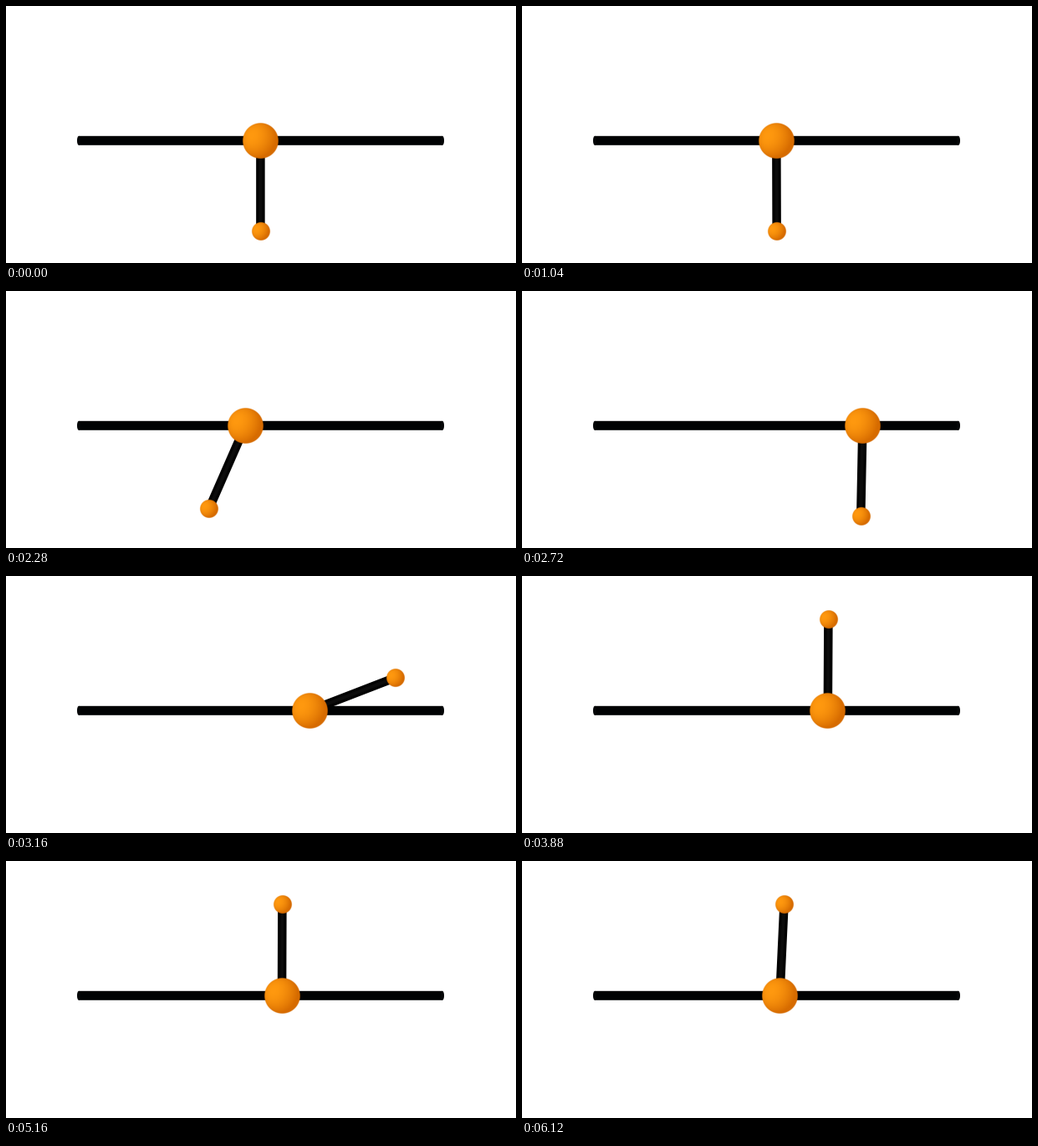
A matplotlib script for the animation above (7.04 s loop, 610 by 308 pixels).

```python
import numpy as np
import matplotlib.pyplot as plt
from matplotlib.animation import FuncAnimation
from matplotlib.patches import Ellipse

W, H, DPI = 610, 308, 100
STEP, FRAMES = 40, 176
CX, CY = 304.4, 161.3
ROD, THICK = 109.1, 11
R_CART, R_BOB = 21.3, 10.6

# key times in s, cart offsets in pixels, rod angles in radians from down
TIMES = np.array([0.96, 1.68, 1.84, 2.28, 2.46, 2.72, 3.0,
                  3.16, 3.5, 3.88, 4.3, 5.16, 6.12])
CART = [0, -14, -23, -18, 37, 103, 100, 59.2, 31, 61.4, 62, 25.6, 4]
ANGLE = [0, 0.105, 0.11, -0.412, -0.79, -0.02, 1.3,
         1.94, 2.87, 3.136, 3.18, 3.138, 3.095]


def spline(values):
    """Smooth curve through the key values, at rest before the first."""
    v = np.array(values, float)
    slope = np.gradient(v, TIMES)
    slope[0] = 0

    def at(t):
        t = np.clip(t, TIMES[0], TIMES[-1])
        i = min(np.searchsorted(TIMES, t, side="right"), len(TIMES) - 1) - 1
        h = TIMES[i + 1] - TIMES[i]
        s = (t - TIMES[i]) / h
        return ((1 - s) ** 2 * ((1 + 2 * s) * v[i] + s * h * slope[i])
                + s * s * ((3 - 2 * s) * v[i + 1] + (s - 1) * h * slope[i + 1]))

    return at


cart_at, angle_at = spline(CART), spline(ANGLE)


def ball_image(n=200):
    """Orange ball lit from the upper left, on a transparent square."""
    v = np.linspace(-1.1, 1.1, n)
    x, y = np.meshgrid(v, v)
    r = np.hypot(x, y)
    k = 1 / np.maximum(r, 1)
    x, y = x * k, y * k
    z = np.sqrt(np.clip(1 - x ** 2 - y ** 2, 0, 1))
    lit = np.clip(0.81 * z - 0.5 * x - 0.3 * y, 0, 1)[..., None] ** 1.2
    dark, bright = np.array([0.84, 0.42, 0]), np.array([1, 0.6, 0.06])
    alpha = np.clip((1 - r) * n / 2.2 + 0.5, 0, 1)
    return np.dstack([dark + (bright - dark) * lit, alpha])


def line(width, color, z):
    return ax.plot([], [], color=color, lw=width * 72 / DPI, zorder=z,
                   solid_capstyle="butt", snap=False)[0]


def ball(z):
    return ax.imshow(BALL, extent=(0, 1, 1, 0), aspect="auto", zorder=z,
                     interpolation="bilinear")


def place(img, x, y, r):
    r *= 1.1
    img.set_extent((x - r, x + r, y + r, y - r))


fig = plt.figure(figsize=(W / DPI, H / DPI), dpi=DPI, facecolor="white")
ax = fig.add_axes([0, 0, 1, 1])
ax.axis("off")
BALL = ball_image()

ENDS = (87, 522)
rail = line(THICK, "#000203", 1)
rail.set_data(ENDS, (CY, CY))
for end in ENDS:
    ax.add_patch(Ellipse((end, CY), 4, THICK, color="#050708", lw=0, zorder=1))

rod = line(THICK - 0.5, "#020202", 2)
gloss = line(4, "#0c0c0c", 2.1)
cart, bob = ball(4), ball(3)


def draw(i):
    t = i * STEP / 1000
    x, a = CX + cart_at(t), angle_at(t)
    bx, by = x + ROD * np.sin(a), CY + ROD * np.cos(a)
    for part in (rod, gloss):
        part.set_data([x, bx], [CY, by])
    place(cart, x, CY, R_CART)
    place(bob, bx, by, R_BOB)
    ax.set_xlim(0, W)
    ax.set_ylim(H, 0)
    return rod, gloss, cart, bob


anim = FuncAnimation(fig, draw, frames=FRAMES, interval=STEP, repeat=True,
                     repeat_delay=0, blit=False)
plt.show()
```
